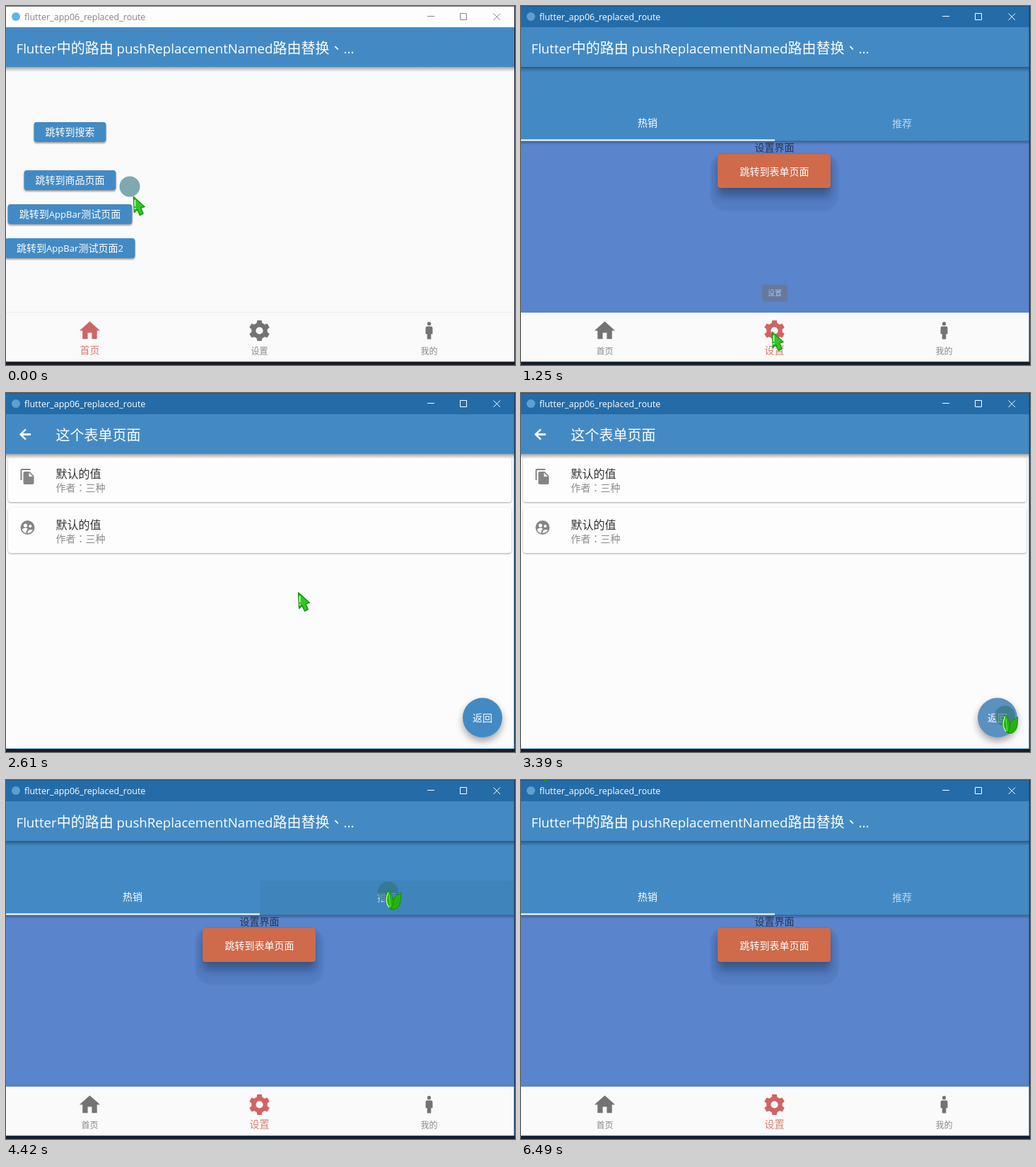
Animation, 720 px wide and 507 px high, one loop 6.66 s. Source, as an HTML page:

```html
<!DOCTYPE html>
<html lang="zh-CN">
<head>
<meta charset="utf-8">
<style>
html, body { margin: 0; width: 100%; height: 100%; overflow: hidden; background: #1b1b24; }
svg { display: block; width: 720px; height: 507px; font-family: "Noto Sans CJK SC", "Noto Sans CJK", "Noto Sans CJK JP", sans-serif; }
.latin { font-family: "Open Sans", "Noto Sans", sans-serif; }
.mark { font-family: "Noto Sans CJK TC", "Noto Sans CJK HK", sans-serif; }
</style>
</head>
<body>
<svg viewBox="0 0 720 507">
  <defs>
    <linearGradient id="fade" x2="0" y2="1">
      <stop stop-opacity=".36"/><stop offset=".45" stop-opacity=".18"/><stop offset="1" stop-opacity="0"/>
    </linearGradient>
    <filter id="soft1" x="-20%" y="-50%" width="140%" height="200%"><feGaussianBlur stdDeviation="1.3"/></filter>
    <filter id="soft5" x="-50%" y="-60%" width="200%" height="220%"><feGaussianBlur stdDeviation="5.5"/></filter>
    <clipPath id="body"><rect y="86" width="719" height="347"/></clipPath>
    <clipPath id="window"><rect width="719" height="502"/></clipPath>
    <clipPath id="button"><rect x="278" y="209" width="160" height="48" rx="4"/></clipPath>
  </defs>
  <g id="stage"></g>
</svg>
<script>
const LOOP = 6660;
const BLUE = '#438ac4', RED = '#d06464', GRAY = '#737373', PAPER = '#fafafa';
const stage = document.getElementById('stage');

const TICKS = [0, 170, 480, 670, 860, 1050, 1260, 1470, 1670, 1860, 2050, 2240, 2440, 2610,
  2810, 3000, 3200, 3390, 3580, 3800, 3990, 4190, 4390, 4600, 4800, 5000, 5190, 5360,
  5530, 5730, 5920, 6110, 6300, 6490];
const PRESSES = [670, 860, 2240, 3390, 4390, 5360];

// Pointer path: time, x, y
const PATH = [
  [0, 179, 268], [170, 450, 400], [480, 357, 456], [670, 354, 459], [1260, 354, 459],
  [2050, 335, 231], [2440, 335, 231], [3200, 680, 453], [3580, 680, 453], [3800, 609, 226],
  [4190, 536, 155], [4600, 536, 155], [5190, 231, 152], [5730, 231, 152], [6110, 170, 100],
  [6490, 23, -26]
];

const clamp = v => Math.max(0, Math.min(1, v));
const ramp = (t, from, to) => clamp((t - from) / (to - from));

function pointerAt(t) {
  const i = Math.max(1, PATH.findIndex(p => p[0] >= t));
  const [t0, x0, y0] = PATH[i - 1], [t1, x1, y1] = PATH[i];
  const k = ramp(t, t0, t1);
  return [x0 + (x1 - x0) * k, y0 + (y1 - y0) * k];
}

const rect = (x, y, w, h, fill, more = '') =>
  `<rect x="${x}" y="${y}" width="${w}" height="${h}" fill="${fill}" ${more}/>`;
const circle = (x, y, r, fill, more = '') =>
  `<circle cx="${x}" cy="${y}" r="${r}" fill="${fill}" ${more}/>`;
const group = (content, attrs) => `<g ${attrs}>${content}</g>`;
const shade = (y, h = 7) => rect(0, y, 719, h, 'url(#fade)');

// Text centred vertically on y; Latin runs use a slightly smaller companion font,
// punctuation one that centres its marks.
function text(str, x, y, size, fill, more = '') {
  const runs = str.replace(/[ -~]+|[、：]/g, s => /[、：]/.test(s)
    ? `<tspan class="mark" lang="zh-TW">${s}</tspan>`
    : `<tspan class="latin" font-size="${size * .935}">${s}</tspan>`);
  return `<text x="${x}" y="${y + size * .37}" font-size="${size}" fill="${fill}" ${more}>${runs}</text>`;
}
const centered = (str, x, y, size, fill, more = '') =>
  text(str, x, y, size, fill, 'text-anchor="middle" ' + more);

const ICONS = {
  home: '<path d="M10 20v-6h4v6h5v-8h3L12 3 2 12h3v8z"/>',
  gear: '<circle cx="12" cy="12" r="5.6" fill="none" stroke="currentColor" stroke-width="4.2"/>' +
    [0, 60, 120, 180, 240, 300].map(a =>
      `<path d="M9.8 2h4.4l.8 4.6h-6z" transform="rotate(${a} 12 12)"/>`).join(''),
  person: '<circle cx="12" cy="5.3" r="1.8"/>' +
    '<path d="M10.3 7.8h3.4a1.7 1.7 0 0 1 1.700 1.700v5.700h-1.500v5h-3.800v-5H8.600V9.500a1.700 1.700 0 0 1 1.700-1.700z"/>',
  copy: '<path d="M16 1H4a2 2 0 0 0-2 2v14h2V3h12zM15 5l6 6v10a2 2 0 0 1-2 2H8a2 2 0 0 1-2-2V7a2 2 0 0 1 2-2zm-1 7h5.500L14 6.500z"/>',
  back: '<path d="M20 11H7.800l5.600-5.600L12 4l-8 8 8 8 1.400-1.400L7.800 13H20z" stroke="currentColor"/>',
  people: '<circle cx="12" cy="12" r="10"/><g fill="#fff"><circle cx="9" cy="9" r="2.600"/>' +
    '<circle cx="15.800" cy="10" r="2"/><path d="M4.200 14.500q5-3.500 8.200-.5-2.400 1.500-2.400 6-4.500-1.200-5.800-5.500z"/>' +
    '<path d="M12 20q0-6.500 7.500-4.700-2.300 4.500-7.500 4.700z"/></g>'
};
const icon = (name, cx, cy, size, color) => group(ICONS[name],
  `transform="translate(${cx - size / 2} ${cy - size / 2}) scale(${size / 24})" fill="${color}" color="${color}"`);

function titleBar(active) {
  const ink = active ? '#fff' : '#858585';
  return rect(0, 0, 719, 30, active ? '#246ca8' : '#fdfdfd') +
    rect(0, 0, 719, 1, active ? '#1e5b90' : '#77777a') +
    circle(14, 15, 6, active ? '#5f9fd0' : '#5fb4e6') +
    text('flutter_app06_replaced_route', 26, 15, 13.4, ink) +
    `<path d="M596 14.500h10M642.500 10.500h9v9h-9zM689.500 10.500l9.500 9.500M699 10.500l-9.500 9.500" fill="none" stroke="${ink}"/>`;
}

function appBar(title, x = 14.5) {
  return shade(86) + rect(0, 30, 719, 56, BLUE) + text(title, x, 60, 20, '#fff');
}

function flatButton(label, x, y, w) {
  return rect(x, y + 2, w, 28, '#000', 'rx="4" opacity=".36" filter="url(#soft1)"') +
    rect(x, y, w, 28, BLUE, 'rx="4"') + centered(label, x + w / 2, y + 14, 14, '#fff');
}

function homePage() {
  return rect(0, 86, 719, 347, PAPER) +
    flatButton('跳转到搜索', 39.5, 164, 102) +
    flatButton('跳转到商品页面', 25.5, 232, 130) +
    flatButton('跳转到AppBar测试页面', 2.5, 280, 176) +
    flatButton('跳转到AppBar测试页面2', -1.5, 328, 184);
}

function hotTab(pressed) {
  const splash = pressed ? group(circle(339, 232, 26, '#fff', 'opacity=".16"'), 'clip-path="url(#button)"') : '';
  return rect(0, 190, 719, 243, '#5a84cc') +
    rect(268, 208, 181, 81, '#1c3c70', 'rx="22" opacity=".1" filter="url(#soft1)"') +
    rect(278, 219, 160, 50, '#10203c', 'rx="6" opacity=".36" filter="url(#soft5)"') +
    rect(278, 210, 160, 48, '#10203c', 'rx="4" opacity=".2" filter="url(#soft1)"') +
    centered('设置界面', 358.5, 200, 14, '#24344f') +
    rect(278, 209, 160, 48, pressed ? '#d37457' : '#cf6a4a', 'rx="4"') + splash +
    centered('跳转到表单页面', 358.5, 233.5, 14, '#fff');
}

function secondTab() {
  return rect(0, 190, 719, 243, PAPER) +
    [215, 263, 311].map(y => text('这是第二个tab', 14.5, y, 16, '#444')).join('');
}

// slide: 0 shows the first tab, 1 the second
function settingsPage(slide, pressed, tabPressed) {
  const views = group(hotTab(pressed), `transform="translate(${-719 * slide} 0)"`) +
    (slide ? group(secondTab(), `transform="translate(${719 * (1 - slide)} 0)"`) : '');
  return group(views, 'clip-path="url(#body)"') + shade(190, 6) +
    rect(0, 86, 719, 104.5, BLUE) +
    (tabPressed ? rect(359 * tabPressed.index, 142, 359, 48, '#000', 'opacity=".045"') : '') +
    centered('热销', 179, 165, 14, '#fff', `opacity="${1 - .35 * slide}"`) +
    centered('推荐', 539, 165.500, 14, '#fff', `opacity="${.65 + .35 * slide}"`) +
    rect(359 * slide, 188.5, 359, 2, '#fff');
}

function card(y, name) {
  return rect(3, y + 1, 712, 64, '#000', 'rx="4" opacity=".34" filter="url(#soft1)"') +
    rect(3, y, 712, 64, '#fdfdfd', 'rx="4"') + icon(name, 30.500, y + 28, 24, '#858585') +
    text('默认的值', 70.500, y + 24, 16, '#333') + text('作者：三种', 70.500, y + 44, 14, '#8c8c8c');
}

function formPage(pressed) {
  return rect(0, 86, 719, 416, '#fcfcfc') + card(90, 'copy') + card(162, 'people') +
    appBar('这个表单页面', 70.500) + icon('back', 27, 58.500, 23, '#fff') +
    circle(674, 464, 28, '#000', 'opacity=".35" filter="url(#soft5)"') +
    circle(674, 458.500, 28, pressed ? '#5b91bf' : BLUE) +
    centered('返回', 674, 458.500, 14, '#fff');
}

function navBar(selected, rippled) {
  const items = [['home', '首页', 118.500], ['gear', '设置', 358.500], ['person', '我的', 598.500]];
  return rect(0, 432, 719, 1, '#000', 'opacity=".05"') + rect(0, 433, 719, 69, PAPER) +
    (rippled ? group(circle(358.500, 467.500, 35 * rippled, '#f0eef4'), 'clip-path="url(#window)"') : '') +
    items.map(([name, label, x], i) => {
      const on = i === selected;
      return icon(name, x, 458.500, 35, on ? RED : GRAY) +
        centered(label, x, on ? 485.500 : 487.500, on ? 14 : 12, on ? '#dc7c72' : '#8a8a8a');
    }).join('');
}

function tooltip(opacity) {
  return group(rect(341, 393.500, 36, 24, '#707070', 'rx="4"') +
    centered('设置', 359, 405.500, 10, '#fff'), `opacity="${opacity}"`);
}

const ARROW = '<path d="M1.500 1.500 17 15.500l-5.500 1.500 3.500 8-4.500 2.500-4-8-4 4z" fill="#35c52a" stroke="#179a10" stroke-width="1.600" stroke-linejoin="round"/>' +
  '<path d="M3.400 6v9m0 2v2" stroke="#d8ffd0" stroke-width="1.600"/>';
const LEAF = '<path d="M22.500 4C20 9 11 5 9 27.500 21 29 23 18 22.500 4z" fill="#24b40c" stroke="#168a05"/>' +
  '<path d="M5 1C0 9-1 20 8 27 14 20 12 8 5 1z" fill="#22b80c" stroke="#168a05" stroke-width=".800"/>' +
  '<path d="M4.500 4Q-1 17 6 25" fill="none" stroke="#c4f5b4" stroke-width="1.400"/>' +
  '<path d="M6 7q1 9 2 17" fill="none" stroke="#72dd55"/>';

function pointer(t, pressed) {
  const [x, y] = pointerAt(t);
  const halo = (cx, cy) => circle(cx, cy, 14.500, 'rgb(45,113,125)', 'opacity=".6"');
  return (t === 0 ? halo(175, 255) : pressed ? halo(x + 4.5, y + 3) : '') +
    group(pressed ? LEAF : ARROW, `transform="translate(${x} ${y})"`);
}

function draw(t) {
  const pressed = PRESSES.includes(t);
  const active = t >= 670;
  const onHome = t < 1050;
  const formShown = ramp(t, 2240, 2610) - ramp(t, 3390, 3800);
  const slide = ramp(t, 4390, 4800) - ramp(t, 5360, 5730);
  const tabPressed = pressed && t > 4000 ? { index: t < 5000 ? 1 : 0 } : null;
  const rippled = t === 670 ? .7 : t === 860 ? 1 : 0;

  let out = '';
  if (formShown < 1) {
    out += (onHome ? homePage() : settingsPage(slide, t === 2240, tabPressed)) +
      appBar('Flutter中的路由 pushReplacementNamed路由替换、...') +
      navBar(onHome ? 0 : 1, rippled);
    if (t >= 860 && t < 1260) out += tooltip(t === 860 ? 1 : .5);
  }
  if (formShown > 0) {
    out += group(formPage(t === 3390),
      `opacity="${formShown}" transform="translate(0 ${40 * (1 - formShown) ** 2})"`);
  }
  const frame = rect(0, 502, 719, 1, active ? '#246ca8' : '#55555c') +
    (active ? rect(718.500, 0, 1, 503, '#1c5688') : '');
  stage.innerHTML = group(out + titleBar(active), 'clip-path="url(#window)"') + frame + pointer(t, pressed);
}

let shown = -1;
function tick() {
  const now = performance.now() % LOOP;
  const t = TICKS.filter(k => k <= now).pop();
  if (t !== shown) draw(shown = t);
  requestAnimationFrame(tick);
}
tick();
</script>
</body>
</html>
```
